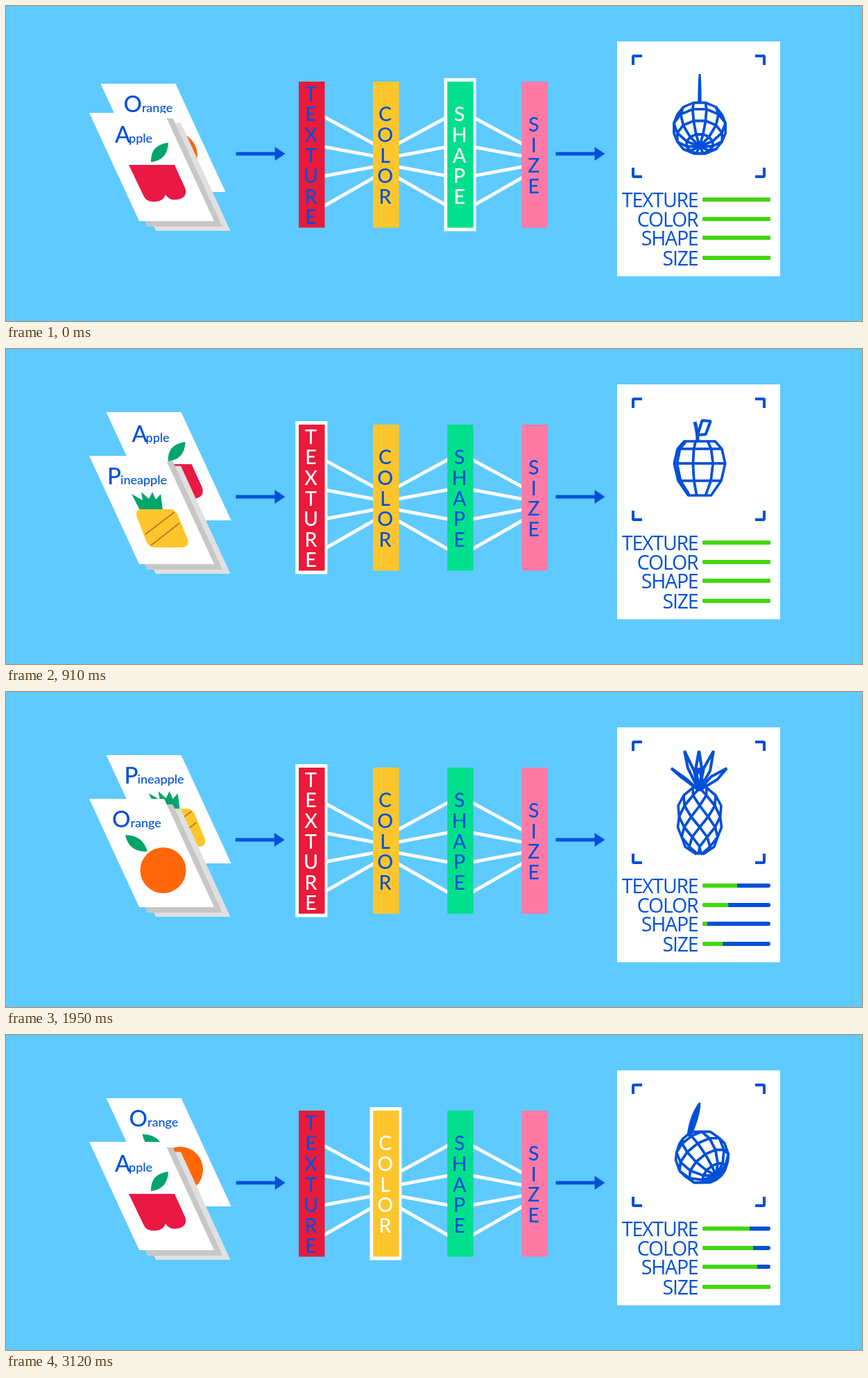
Write an HTML page with a canvas that moves like this. It is 1234 px wide and 454 px high and loops after 3250 ms.

```html
<!DOCTYPE html>
<html lang="en">
<head>
<meta charset="utf-8">
<title>Fruit classifier</title>
<style>
html, body { margin: 0; width: 100%; height: 100%; overflow: hidden; background: #5fcaff; }
canvas { display: block; }
</style>
</head>
<body>
<canvas id="stage" width="1234" height="454"></canvas>
<script>
const ctx = document.getElementById('stage').getContext('2d');
const { PI, sin, cos, min, max, abs } = Math;
const STEP = 130, STEPS = 25;
const BLUE = '#0050d7', GREEN = '#00a56a', LIME = '#42d80d';
const ROUND = 'Lato, sans-serif', NARROW = '"Open Sans", sans-serif';

function shape(d, color) {
  ctx.fillStyle = color;
  ctx.fill(new Path2D(d));
}

function stroke(d, color, width) {
  ctx.strokeStyle = color;
  ctx.lineWidth = width;
  ctx.stroke(new Path2D(d));
}

function rect(x, y, w, h, color) {
  ctx.fillStyle = color;
  ctx.fillRect(x, y, w, h);
}

function write(text, x, y, size, { color = BLUE, align = 'left', family = ROUND, spacing = 0 } = {}) {
  ctx.font = `500 ${size}px ${family}`;
  ctx.letterSpacing = spacing + 'px';
  ctx.textAlign = align;
  ctx.fillStyle = color;
  ctx.fillText(text, x, y);
}

// Cards on the left

const CARD = 'M120 154H228L300 310H192Z';
const fruits = [
  { name: 'Apple', x: 157, rest: 177, y: 197, draw() {
    shape('M177 229H243L258 262Q263 276 247 279Q236 281 230 272Q227 281 216 282Q203 283 199 275Z', '#ea1844');
    shape('M209 225Q208 200 234 197Q233 222 209 225Z', GREEN);
  } },
  { name: 'Pineapple', x: 146, rest: 165, y: 195, draw() {
    shape('M193 232L181 209L197 218L195 206L206 216L211 206L216 217L223 209L226 232Z', GREEN);
    shape('M195 231H236Q243 231 247 238L262 274Q265 286 253 286H214Q207 286 203 279L189 243Q185 231 195 231Z', '#fec62d');
    stroke('M201 267L243 235M209 283L250 251', '#c07a1d', 2);
  } },
  { name: 'Orange', x: 153, rest: 179.5, y: 195, draw() {
    shape('M172 206Q197 206 204 230Q177 231 172 206Z', GREEN);
    ctx.fillStyle = '#ff670a';
    ctx.beginPath();
    ctx.arc(226.5, 257, 33, 0, 2 * PI);
    ctx.fill();
  } }
];

function card(i, lift = 0) {
  const { name, x, rest, y, draw } = fruits[i];
  ctx.save();
  ctx.translate(lift * 0.39, -lift);
  shape(CARD, '#fff');
  draw();
  write(name[0], x, y, 33);
  write(name.slice(1), rest, y, 18);
  ctx.restore();
}

function cards(k) {
  const starts = [4, 13, 21], ends = [10, 18, 27];
  const front = starts.filter(s => k > s).length % 3;
  const moved = (front + 2) % 3;
  const now = k < 5 ? k + STEPS : k;
  const rise = 42 * (now - starts[moved]), fall = 21 * (ends[moved] - now);
  const lift = min(rise, fall);
  const behind = fall <= rise;
  if (lift > 0 && behind) card(moved, lift);
  shape('M144 168.5H252L323.5 324H216Z', '#e0e0e0');
  shape('M132 162H240.5L312 318H204Z', '#c7c7c7');
  card(front);
  if (lift > 0 && !behind) card(moved, lift);
}

// Network in the middle

const columns = [
  ['TEXTURE', '#ea1a3a'], ['COLOR', '#fec62d'], ['SHAPE', '#00e08c'], ['SIZE', '#ff7ba6']
];

function network(k) {
  const active = k - [7, 15, 23].filter(s => k >= s).pop();
  const wide = [160, 203, 245, 288], tight = [198, 216, 232, 248];
  for (let c = 0; c < 3; c++) {
    const [from, to] = c % 2 ? [tight, wide] : [wide, tight];
    const x = 459 + 107 * c;
    from.forEach((y, i) => {
      const over = (to[i] - y) * 2 / 70;
      stroke(`M${x - 2} ${y - over}L${x + 72} ${to[i] + over}`, '#fff', 5);
    });
  }
  columns.forEach(([word, color], c) => {
    const x = 422 + 107.1 * c, on = c === active;
    if (on) rect(x - 4.7, 104, 46, 220.5, '#fff');
    rect(x, 109, 37.5, 210.5, color);
    [...word].forEach((letter, i) => {
      const y = 225.5 + 29.6 * (i - (word.length - 1) / 2);
      write(letter, x + 17.5, y, 28.5, { color: on ? '#fff' : BLUE, align: 'center' });
    });
  });
}

function arrow(x) {
  shape(`M${x} 210.5h56v-7.5l15 10l-15 10v-7.5h-56Z`, BLUE);
}

// Wireframe models

function face(points) {
  const [a, b, c, d] = points;
  const facing = (c[0] - a[0]) * (d[1] - b[1]) - (c[1] - a[1]) * (d[0] - b[0]);
  if (facing <= 0.5) return;
  const outline = 'M' + points.map(p => p.join(' ')).join('L') + 'Z';
  shape(outline, '#fff');
  stroke(outline, BLUE, 3.6);
}

function lathe(rings, n, spin, place, diamonds) {
  const at = (i, j) => {
    const a = spin + j * 2 * PI / n, [r, y] = rings[i];
    return place(r * sin(a), y, r * cos(a));
  };
  for (let i = 0; i < rings.length - (diamonds ? 2 : 1); i++) {
    for (let m = 0; m < n; m++) {
      const j = diamonds ? m + i / 2 : m;
      face(diamonds
        ? [at(i, j), at(i + 1, j + 0.5), at(i + 2, j), at(i + 1, j - 0.5)]
        : [at(i, j), at(i, j + 1), at(i + 1, j + 1), at(i + 1, j)]);
    }
  }
}

const upright = (x, y) => [1000 + x, y];

function appleModel(k) {
  const turn = (9 - k) * 0.47 + 0.1, c = cos(turn);
  const px = x => 997 + x * c;
  lathe([[23, 133], [33, 144], [38, 165], [32, 190], [17, 211]], 8, -turn, upright);
  stroke(`M997 132Q997 120 ${px(-8)} 105`, BLUE, 5);
  stroke(`M997 124L${px(13)} 103L${px(37)} 104L${px(23)} 123Z`, BLUE, 4);
}

function pineappleModel(k) {
  const turn = (k - 13) * PI / 8;
  const rings = [[14, 138], [25, 149], [31, 164], [32, 180], [31.5, 195], [28, 209], [21, 223], [5, 234]];
  lathe(rings, 8, turn, upright, true);
  for (const [r, top] of [[21, 85], [40, 110]]) {
    for (let i = 0; i < 4; i++) {
      const x = r * cos(turn + PI / 4 + i * PI / 2), mid = (top + 138) / 2;
      const mx = 999 + x * 0.55;
      stroke(`M999 142L${mx - 4.5} ${mid - 2}L${999 + x} ${top}L${mx + 4.5} ${mid + 2}Z`, BLUE, 4);
    }
  }
}

function orangeModel(k) {
  const yaw = (k - 21) * PI / 4, tilt = 0.82, R = 38.5;
  const place = (x, y, z) => {
    const y1 = y * cos(tilt) + z * sin(tilt), z1 = z * cos(tilt) - y * sin(tilt);
    return [1000 + 5 * sin(yaw) + x * cos(yaw) - z1 * sin(yaw), 176 + y1];
  };
  const leaf = () => {
    const [x, y] = place(0, -R, 0), w = 1.5 + 8 * abs(sin(yaw));
    const mx = (x + 1000) / 2, my = (y + 98) / 2 - 4;
    const outline = `M${x - 1} ${y}Q${mx - w} ${my} 1000 98Q${mx + w} ${my} ${x + 1} ${y}Z`;
    shape(outline, BLUE);
    stroke(outline, BLUE, 3);
  };
  const rings = Array.from({ length: 7 }, (_, i) => [R * sin(i * PI / 6), -R * cos(i * PI / 6)]);
  const towards = cos(yaw) > 0;
  if (!towards) leaf();
  lathe(rings, 12, 0.26, place);
  if (towards) leaf();
}

// Result sheet on the right

// Bar levels for apple, pineapple and orange
const levels = [[1, 0.51, 0.39], [1, 0.38, 0.49], [1, 0.07, 0.61], [1, 0.3, 1]];

function level(row, k) {
  const values = levels[row];
  return [[8, 11], [15, 18], [23, 25]].reduce((value, [start, end], i) => {
    const p = max(0, min(1, (k - start) / (end - start)));
    return value + (values[(i + 1) % 3] - values[i]) * p;
  }, values[0]);
}

function sheet(k) {
  rect(881, 51, 235, 338.5, '#fff');

  const open = [[3, 4], [11, 13], [19, 21]].some(([a, b]) => k >= a && k <= b);
  const w = open ? 97.3 : 94.5, h = open ? 89.8 : 87;
  for (const sx of [-1, 1]) {
    for (const sy of [-1, 1]) {
      const x = 998.5 + sx * w, y = 159 + sy * h;
      stroke(`M${x} ${y - sy * 13}V${y}H${x - sx * 13}`, BLUE, 4);
    }
  }

  if (k < 11) appleModel(k);
  else if (k < 19) pineappleModel(k);
  else orangeModel(k);

  columns.forEach(([word], i) => {
    const y = [279, 307, 334, 363][i];
    write(word, 997.5, y + 10.5, 28.5, { align: 'right', family: NARROW, spacing: -1.2 });
    ctx.save();
    ctx.beginPath();
    ctx.roundRect(1004, y - 3, 98, 6, 3);
    ctx.clip();
    rect(1004, y - 3, 98, 6, BLUE);
    rect(1004, y - 3, 98 * level(i, k), 6, LIME);
    ctx.restore();
  });
}

function draw(ms) {
  const step = Math.floor(ms / STEP) % STEPS;
  // The first steps still belong to the end of the orange's turn.
  const k = step < 3 ? step + STEPS : step;
  const phase = 2 * PI * step * 3 / STEPS;
  const nudge = (size, peak) => size * max(0, cos(phase - 2 * PI * peak));
  rect(0, 0, 1234, 454, '#5fcaff');
  ctx.lineJoin = 'miter';
  cards(k);
  network(k);
  arrow(328 + nudge(4, 0.93));
  arrow(792.5 + nudge(4.5, 0.26));
  ctx.lineJoin = 'bevel';
  sheet(k);
}

const start = performance.now();
function loop() {
  draw(performance.now() - start);
  requestAnimationFrame(loop);
}
loop();
</script>
</body>
</html>
```
